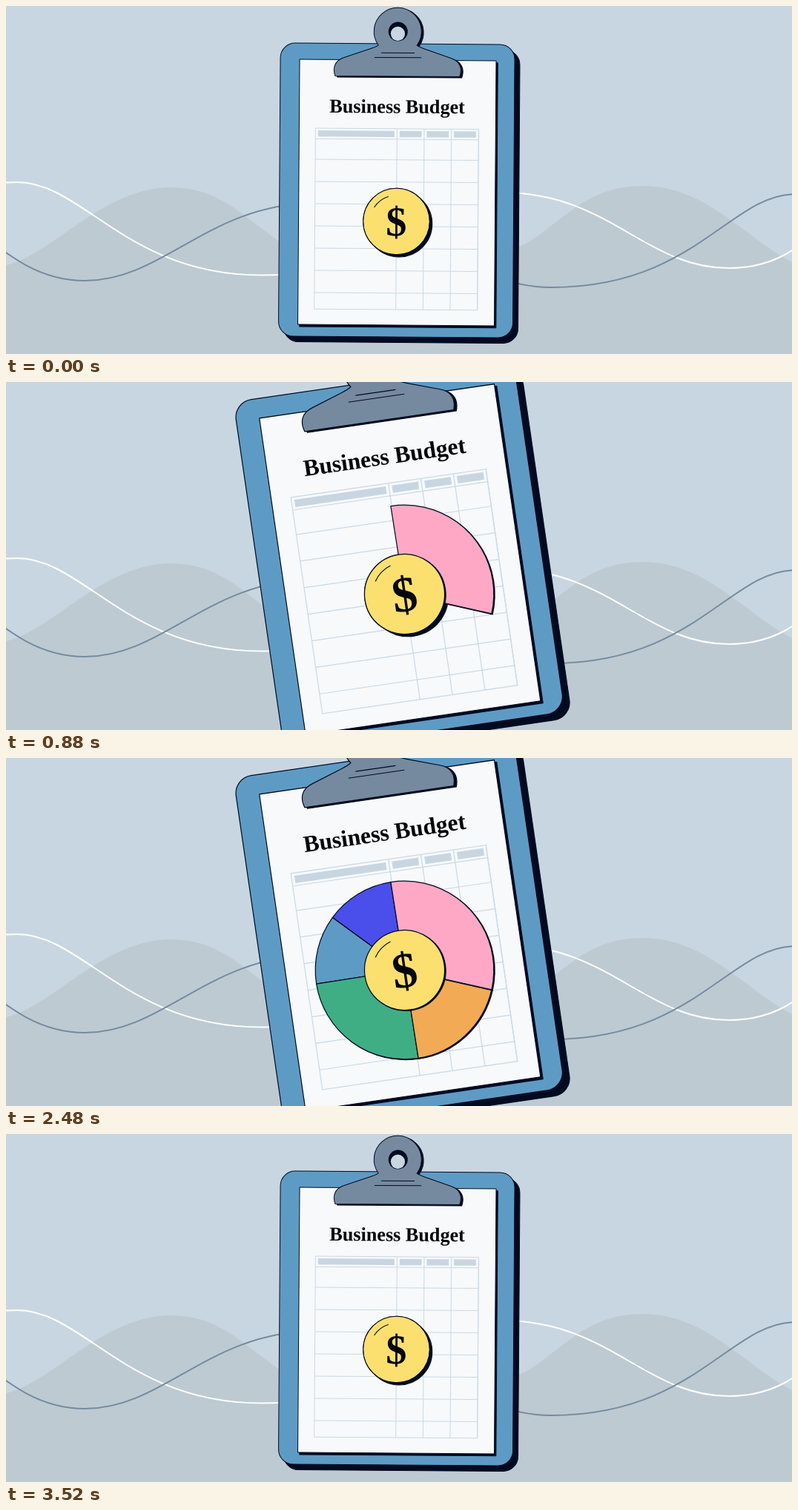
Write an HTML page with a canvas that moves like this. It is 1060 by 470 pixels and loops after 4160 ms.

```html
<!DOCTYPE html>
<html lang="en">
<head>
<meta charset="utf-8">
<title>Business Budget</title>
<style>
  html, body { margin: 0; width: 100%; height: 100%; overflow: hidden; background: #c8d6e1; }
  canvas { display: block; }
</style>
</head>
<body>
<canvas id="stage" width="1060" height="470"></canvas>
<script>
const ctx = document.getElementById('stage').getContext('2d');
const LOOP = 4160, STEP = 80, TILT_TIME = 400, TILT_BACK = 3120;
const FIRST_SLICE = 640, SLICE_GAP = 400, POP_STEPS = 4;
const INK = '#000a20', SKY = '#c8d6e1', HILL = '#bdcad2', STEEL = '#768a9f',
      BLUE = '#5e9bc4', PAPER = '#f7f9fb', GRID = '#c9d9e5', GOLD = '#fbe06f';
const COIN_R = 44.7, PIE_R = 99.6, PIE_MIN_R = 42;

const slices = [
  { share: 0.31, color: '#ffa8c6' },
  { share: 0.19, color: '#f2aa55' },
  { share: 0.25, color: '#3fae84' },
  { share: 0.125, color: BLUE },
  { share: 0.125, color: '#4a4eea' }
];

const rad = deg => deg * Math.PI / 180;
const lerp = (a, b, p) => a + (b - a) * p;
const clamp01 = x => Math.min(1, Math.max(0, x));
const ease = x => x / 2 + (1 - Math.cos(Math.PI * x)) / 4;
const backOut = x => 1 + 2.7 * (x - 1) ** 3 + 1.7 * (x - 1) ** 2;

function circle(x, y, r) {
  const path = new Path2D();
  path.arc(x, y, r, 0, Math.PI * 2);
  return path;
}

function box(left, top, right, bottom, radius = 0) {
  const path = new Path2D();
  path.roundRect(left, top, right - left, bottom - top, radius);
  return path;
}

function paint(path, fill) {
  ctx.fillStyle = fill;
  ctx.strokeStyle = INK;
  ctx.fill(path);
  ctx.stroke(path);
}

function paintRaised(path, fill, dx, dy) {
  ctx.save();
  ctx.translate(dx, dy);
  paint(path, INK);
  ctx.restore();
  paint(path, fill);
}

function line(x1, y1, x2, y2) {
  ctx.beginPath();
  ctx.moveTo(x1, y1);
  ctx.lineTo(x2, y2);
  ctx.stroke();
}

const hills = new Path2D(
  'M0 350 C60 338 130 245 222 245 C300 245 330 300 390 330 H680 ' +
  'C740 310 770 243 858 243 C943 243 990 308 1060 346 V470 H0 Z');
const whiteWave = new Path2D(
  'M-315 363 C-183 363 -117 238 15 238 C104 238 163 363.5 345 363.5 ' +
  'S540 252 670 252 C813 252 862 354 975 354 C1098 354 1119 238 1180 238');
const grayWave = new Path2D(
  'M-110 266 C-48 266 -2 371 107 371 C213 371 273 266 420 266 ' +
  'S609 380 735 380 C929 380 976 254 1065 254');

function drawBackground() {
  ctx.fillStyle = SKY;
  ctx.fillRect(0, 0, 1060, 470);
  ctx.fillStyle = HILL;
  ctx.fill(hills);
  ctx.lineWidth = 2;
  ctx.strokeStyle = '#fff';
  ctx.stroke(whiteWave);
  ctx.strokeStyle = STEEL;
  ctx.stroke(grayWave);
}

// Clipboard parts are placed relative to the centre of the coin
const board = box(-158, -240, 158, 156, 20);
const paper = box(-132, -218, 133, 140);
const clip = new Path2D(
  'M-84 -196 C-88 -208 -84 -217 -72 -221 L-37 -233 C-31 -235 -28 -236.5 -26 -238 ' +
  'A32 32 0 1 1 26 -238 C28 -236.5 31 -235 37 -233 L72 -221 C84 -217 88 -208 84 -196 Z');

function drawClipboard() {
  paintRaised(board, BLUE, 7, 7.5);
  paintRaised(paper, PAPER, 2.3, 2.8);
  paintRaised(clip, STEEL, 2.8, 1.5);
  ctx.fillStyle = INK;
  ctx.fill(circle(0.5, -256.5, 13));
  ctx.fillStyle = SKY;
  ctx.fill(circle(0.2, -253.6, 9.6));
  line(-22, -227.7, 23, -227.7);
  line(-31, -221.4, 32, -221.4);
}

function drawTable() {
  const side = 110, top = -125.3, bottom = 119, column = side / 3;
  ctx.strokeStyle = GRID;
  ctx.stroke(box(-side, top, side, bottom));
  line(-side, -111, side, -111);
  for (let y = -83.3; y < bottom; y += 30) line(-side, y, side, y);

  ctx.fillStyle = SKY;
  for (let i = -1; i < 3; i++) {
    const left = i < 0 ? -side : i * column;
    const right = (i + 1) * column;
    line(right, top, right, bottom);
    ctx.fillRect(left + 3.5, -122.3, right - left - 7, 8.4);
  }
}

function drawText(text, size, y) {
  ctx.font = `bold ${size}px "Liberation Serif", "Times New Roman", serif`;
  ctx.textAlign = 'center';
  ctx.fillStyle = '#05060a';
  ctx.fillText(text, 0, y);
}

function drawPie(t, radius) {
  // Laid counterclockwise so that earlier slices overlap later ones
  let end = 1;
  for (let i = slices.length - 1; i >= 0; i--) {
    const { share, color } = slices[i];
    const age = t - FIRST_SLICE - i * SLICE_GAP;
    const start = end - share;
    if (age >= 0) {
      const pop = backOut(clamp01((age / STEP + 1) / POP_STEPS));
      const wedge = new Path2D();
      wedge.moveTo(0, 0);
      wedge.arc(0, 0, radius * pop, rad(start * 360 - 90.6), rad(end * 360 - 90.6));
      wedge.closePath();
      paintRaised(wedge, color, 1, 0.9);
    }
    end = start;
  }
}

function drawCoin(t, pieRadius) {
  const coin = circle(0, 0, COIN_R);
  paintRaised(coin, INK, 3.6, 3.2);
  if (pieRadius > COIN_R) drawPie(t, pieRadius);
  paintRaised(coin, GOLD, 1.2, 0.9);
  ctx.beginPath();
  ctx.arc(0, 0, 35.5, rad(212), rad(252));
  ctx.stroke();
  drawText('$', 56, 19);
}

function render(now) {
  const t = Math.floor(now % LOOP / STEP) * STEP;
  const p = ease(clamp01(t / TILT_TIME)) - ease(clamp01((t - TILT_BACK) / TILT_TIME));
  const scale = lerp(1, 1.208, p);

  drawBackground();
  ctx.save();
  ctx.translate(lerp(526.5, 537.5, p), lerp(291, 286.5, p));
  ctx.rotate(rad(lerp(0.4, -8.3, p)));
  ctx.scale(scale, scale);
  ctx.lineWidth = 1;
  ctx.lineJoin = 'round';
  drawClipboard();
  drawTable();
  drawText('Business Budget', 26.2, -146.5);
  drawCoin(t, lerp(PIE_MIN_R, PIE_R, p));
  ctx.restore();
}

const origin = performance.now();
function tick() {
  render(performance.now() - origin);
  requestAnimationFrame(tick);
}
tick();
</script>
</body>
</html>
```
